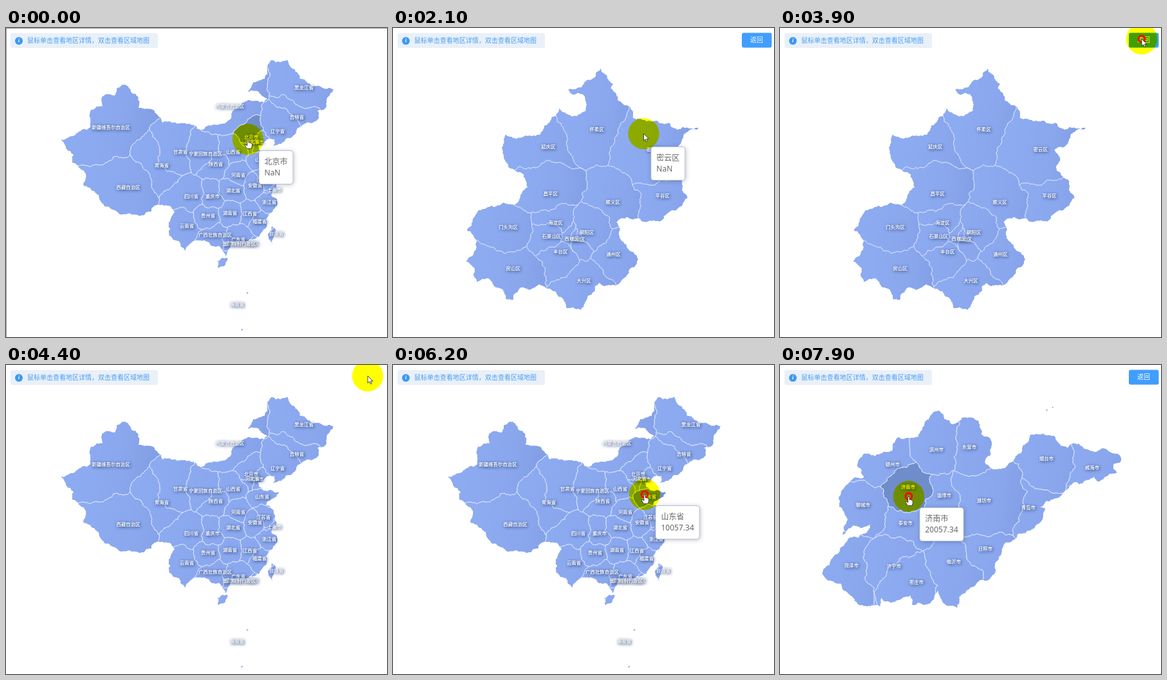
Write an HTML page with a canvas that moves like this. It is 592x480 px and loops after 8000 ms.

```html
<!DOCTYPE html>
<html lang="zh">
<head>
<meta charset="utf-8">
<style>
html, body { margin: 0; width: 100%; height: 100%; overflow: hidden; background: #fff; }
canvas { display: block; }
</style>
</head>
<body>
<canvas id="stage" width="592" height="480"></canvas>
<script>
const ctx = document.getElementById('stage').getContext('2d');
const LOOP = 8000, WIDTH = 592, HEIGHT = 480;
const SANS = '"Noto Sans", "Noto Sans CJK SC", sans-serif';

// Key points of each coast, clockwise; crinkle() adds the detail.
const chinaCoast = '86,173 107,167 132,154 132,127 150,122 149,108 169,105 181,88 190,91 205,107 206,124 234,134 244,147 275,148 306,158 328,151 350,140 352,129 380,113 406,110 393,99 376,99 384,84 402,79 413,50 438,50 456,78 481,90 509,95 496,125 484,128 484,142 452,157 437,171 415,183 418,171 409,172 391,182 400,195 424,198 402,218 420,249 412,260 421,266 418,280 405,302 384,328 345,344 341,354 336,344 306,330 287,334 279,346 253,322 262,285 235,274 212,291 180,290 145,263 121,245 124,226 103,209 105,197';
const beijingCoast = '328,29 339,42 350,57 346,65 381,98 386,118 410,124 450,126 465,139 506,136 474,157 448,175 458,194 452,213 474,231 484,261 462,284 447,290 405,304 398,298 357,304 361,325 371,344 395,371 372,404 356,418 325,414 304,440 292,462 266,458 248,430 186,422 170,445 158,443 130,408 106,412 102,388 87,375 104,355 106,338 88,320 100,297 153,270 174,274 197,243 188,218 176,214 155,192 153,165 157,148 195,150 224,141 248,114 254,101 266,111 301,106 302,90 297,76 280,76 270,66 298,57 317,46';
const shandongCoast = '247,71 268,92 300,82 313,108 328,118 327,140 318,150 335,162 350,160 390,108 425,110 446,129 458,122 480,132 525,138 529,150 518,155 523,168 495,181 488,173 450,187 425,208 402,222 412,222 408,238 370,262 340,300 335,318 305,340 278,360 275,377 262,374 245,350 240,362 205,372 203,358 157,362 155,375 135,375 95,340 75,335 66,322 85,295 95,283 130,262 140,248 97,265 103,235 92,220 95,200 110,180 130,175 120,155 130,138 175,132 185,112 215,112 225,90';

// Points of a rough line from a to b, the same in both directions.
function crinkle(a, b) {
  const flip = a[0] > b[0] || (a[0] === b[0] && a[1] > b[1]);
  const [p, q] = flip ? [b, a] : [a, b];
  let seed = (p[0] * 7919 + p[1] * 104729 + q[0] * 1299709 + q[1] * 15485) % 2147483646 + 1;
  const random = () => (seed = (seed * 16807) % 2147483647) / 2147483647;
  random();
  const points = [p];
  function split(x1, y1, x2, y2) {
    const dx = x2 - x1, dy = y2 - y1;
    if (Math.hypot(dx, dy) < 2.6) return points.push([x2, y2]);
    const k = (random() - .5) * .38;
    const mx = x1 + dx / 2 - dy * k, my = y1 + dy / 2 + dx * k;
    split(x1, y1, mx, my);
    split(mx, my, x2, y2);
  }
  split(...p, ...q);
  return flip ? points.reverse() : points;
}

function roughPath(corners) {
  const path = new Path2D();
  corners.forEach((c, i) => crinkle(c, corners[(i + 1) % corners.length])
    .forEach((p, j) => i + j ? path.lineTo(...p) : path.moveTo(...p)));
  path.closePath();
  return path;
}

// Power distance: a region owns the points for which this is smallest.
const distance = (s, x, y) => (x - s.x) ** 2 + (y - s.y) ** 2 - s.weight;

function cellOf(site, sites) {
  let poly = [[0, 0], [WIDTH, 0], [WIDTH, HEIGHT], [0, HEIGHT]];
  for (const other of sites) {
    if (other === site) continue;
    const side = p => distance(site, ...p) - distance(other, ...p);
    poly = poly.flatMap((p, i) => {
      const q = poly[(i + 1) % poly.length], a = side(p), b = side(q);
      const kept = a <= 0 ? [p] : [];
      if (a * b < 0) kept.push(p.map((v, n) => v + (q[n] - v) * a / (a - b)));
      return kept;
    });
  }
  return roughPath(poly.map(p => p.map(Math.round)));
}

// Each label is "name x y [weight]"; borders follow from the labels.
function makeMap(coasts, labels) {
  const land = new Path2D();
  for (const coast of coasts) land.addPath(roughPath(coast.split(' ').map(p => p.split(',').map(Number))));
  const sites = labels.split('|').map(label => {
    const [name, x, y, weight = 0] = label.split(' ');
    return { name, x: +x, y: +y, weight: +weight };
  });
  for (const site of sites) {
    site.cell = cellOf(site, sites);
    site.fill = ctx.createLinearGradient(site.x - 55, site.y, site.x + 65, site.y + 15);
    site.fill.addColorStop(0, '#8dabf1');
    site.fill.addColorStop(.6, '#8aa7ee');
    site.fill.addColorStop(1, '#829fe6');
  }
  return { land, sites };
}

const china = makeMap(
  [chinaCoast, '328,362 344,357 341,367 330,373', '413,308 419,316 414,338 408,327', '374,410 377,411 375,413', '365,470 368,467 368,469'],
  '黑龙江省 463 93|吉林省 452 139|辽宁省 422 161|内蒙古自治区 348 122 1000|北京市 381 170|天津市 389 178|河北省 383 177|山西省 353 193|山东省 398 205|新疆维吾尔自治区 163 155|甘肃省 271 193|宁夏回族自治区 310 196|陕西省 326 212|青海省 242 214|河南省 361 229|江苏省 400 237|安徽省 387 245|上海市 417 252|湖北省 353 253|西藏自治区 190 248|四川省 288 262|重庆市 321 262|浙江省 409 271|贵州省 314 292|湖南省 348 288|江西省 379 289|福建省 394 301|云南省 281 308|广西壮族自治区 325 322|广东省 361 329 150|香港特别行政区 367 335|澳门特别行政区 362 336|台湾省 420 320|海南省 359 430');
const beijing = makeMap(
  [beijingCoast],
  '怀柔区 321 139|延庆区 234 170|密云区 423 175 3000|昌平区 238 255|顺义区 350 270|平谷区 439 258 1000|门头沟区 162 314|海淀区 247 307|朝阳区 303 324|石景山区 240 331|东城区 287 336|西城区 276 335|丰台区 256 358|通州区 351 363|房山区 171 389|大兴区 298 410');
const shandong = makeMap(
  [shandongCoast, '414,69 416,70 414,72', '423,65 425,66 423,67'],
  '滨州市 243 132|东营市 294 128|德州市 175 155|济南市 199 190 300|淄博市 255 203|聊城市 129 218|潍坊市 317 211 2500|烟台市 414 146|威海市 485 160|青岛市 386 222|泰安市 195 246|日照市 319 286|菏泽市 111 312|济宁市 177 313|枣庄市 212 338|临沂市 270 306');

const views = [[0, china], [600, beijing], [4000, china], [6400, shandong]];
const values = { 山东省: '10057.34', 济南市: '20057.34' };
const track = [[0, 376, 173], [600, 376, 173], [900, 380, 169], [1900, 380, 169], [2600, 413, 152], [2750, 413, 152], [3100, 554, 56], [3500, 562, 17],
  [4700, 562, 17], [5800, 391, 201], [6600, 391, 201], [7000, 311, 206], [7400, 228, 206], [7700, 200, 204], [LOOP, 200, 204]];
const clicks = [300, 480, 3800, 6120, 6300, 7840];

const ramp = (t, a, b) => Math.min(1, Math.max(0, (t - a) / (b - a)));
const mapAt = t => views.filter(v => v[0] <= t).pop()[1];

function pointer(t) {
  const i = Math.max(1, track.findIndex(k => k[0] >= t));
  const [a, x, y] = track[i - 1], [b, u, v] = track[i];
  const k = ramp(t, a, b);
  return [x + (u - x) * k, y + (v - y) * k];
}

// The Beijing map shrinks once towards a fixed point.
function cameraAt(t) {
  const zoom = mapAt(t) === beijing ? 1 - .135 * ramp(t, 1500, 1700) : 1;
  return { zoom, ox: 288 * (1 - zoom), oy: 280 * (1 - zoom) };
}

function regionAt(t) {
  const { land, sites } = mapAt(t), { zoom, ox, oy } = cameraAt(t);
  const [px, py] = pointer(t), x = (px - ox) / zoom, y = (py - oy) / zoom;
  if (!ctx.isPointInPath(land, x, y)) return null;
  return sites.reduce((a, b) => distance(b, x, y) < distance(a, x, y) ? b : a);
}

function shadow(color, blur, offset = 0) {
  ctx.shadowColor = color;
  ctx.shadowBlur = blur;
  ctx.shadowOffsetX = ctx.shadowOffsetY = offset;
}

function text(str, x, y, size, color, align = 'left') {
  ctx.font = `${size}px ${SANS}`;
  ctx.textAlign = align;
  ctx.textBaseline = 'middle';
  ctx.fillStyle = color;
  ctx.fillText(str, x, y);
}

function box(x, y, w, h, r, color) {
  ctx.beginPath();
  ctx.roundRect(x, y, w, h, r);
  ctx.fillStyle = color;
  ctx.fill();
}

function disc(x, y, r, color) {
  ctx.beginPath();
  ctx.arc(x, y, r, 0, 7);
  ctx.fillStyle = color;
  ctx.fill();
}

function drawMap({ land, sites }, { zoom, ox, oy }, active) {
  ctx.save();
  ctx.transform(zoom, 0, 0, zoom, ox, oy);
  ctx.fillStyle = '#8aa7ee';
  ctx.fill(land);
  ctx.clip(land);
  for (const site of sites) {
    ctx.fillStyle = site === active ? '#6f8dcb' : site.fill;
    ctx.fill(site.cell);
  }
  ctx.strokeStyle = '#d9e4fc';
  ctx.lineWidth = .9;
  sites.forEach(s => ctx.stroke(s.cell));
  ctx.restore();

  ctx.save();
  shadow('rgba(45,70,120,.9)', 4, 1);
  for (const { name, x, y } of sites)
    for (let pass = 0; pass < 2; pass++) text(name, ox + x * zoom, oy + y * zoom, 7.4, '#fff', 'center');
  ctx.restore();
}

function drawHeader(back) {
  box(7, 8, 229, 23, 3, '#e9f0f8');
  disc(20, 20, 6, '#3d98f5');
  ctx.font = 'italic bold 9px "Liberation Serif", serif';
  ctx.textAlign = 'center';
  ctx.textBaseline = 'middle';
  ctx.fillStyle = '#fff';
  ctx.fillText('i', 20, 20);
  text('鼠标单击查看地区详情，双击查看区域地图', 33, 20, 10, '#469df5');
  if (!back) return;
  box(542, 7.5, 46.5, 23, 3, '#409eff');
  text('返回', 565, 19.5, 10, '#fff', 'center');
}

function drawTip(name, value, x, y, alpha) {
  ctx.save();
  ctx.globalAlpha = alpha;
  ctx.font = `12px ${SANS}`;
  const w = Math.max(ctx.measureText(name).width, ctx.measureText(value).width) + 17;
  if (alpha === 1) shadow('rgba(0,0,0,.25)', 7, 1);
  box(x, y, w, 52, 4, '#fff');
  shadow('transparent', 0);
  ctx.strokeStyle = '#a3b2d2';
  ctx.lineWidth = .8;
  ctx.stroke();
  text(name, x + 8.5, y + 18, 12, '#666');
  text(value, x + 8.5, y + 35.5, 12, '#666');
  ctx.restore();
}

const arrow = new Path2D('M0 0V11L2.6 8.7L4.4 12.6L6.2 11.8L4.5 8H8Z');
const hand = new Path2D('M-1.2 1Q0-.8 1.2 1V5.2Q2.6 4.4 3.2 5.6Q4.6 5 5 6.4Q6.4 6 6.4 7.5V10.5L5 14.5H-1.5L-4.6 9.5Q-4.8 7.6-3 8.2L-1.2 9.8Z');

function drawPointer(x, y, shape, clicked) {
  ctx.save();
  ctx.translate(x, y);
  if (clicked) {
    ctx.beginPath();
    ctx.arc(0, 0, 5, 0, 7);
    ctx.strokeStyle = '#f00';
    ctx.lineWidth = 3;
    ctx.stroke();
  }
  ctx.fillStyle = '#fff';
  ctx.fill(shape);
  ctx.strokeStyle = '#333';
  ctx.lineWidth = .9;
  ctx.stroke(shape);
  ctx.restore();
}

// The tip trails the pointer, stays where it left the land and fades.
function drawHover(t) {
  for (let age = 0; age < 600; age += 20) {
    const since = Math.max(0, t - age), region = regionAt(since);
    if (!region) continue;
    const [x, y] = pointer(since - 120);
    return drawTip(region.name, values[region.name] || 'NaN', x + 17, y + 17.5, 1 - ramp(age, 200, 600));
  }
}

function draw(t) {
  const map = mapAt(t), region = regionAt(t);
  const touch = region && map !== beijing;
  const [x, y] = pointer(t);
  ctx.fillStyle = '#fff';
  ctx.fillRect(0, 0, WIDTH, HEIGHT);
  drawMap(map, cameraAt(t), touch && region);
  drawHeader(map !== china);
  if (t < 100) {
    ctx.fillStyle = '#999';
    ctx.fillRect(0, 0, WIDTH, 1);
    ctx.fillRect(0, 0, 1, HEIGHT);
  }
  ctx.globalCompositeOperation = 'multiply';
  disc(x, y, 24.2, '#ff0');
  ctx.globalCompositeOperation = 'source-over';
  drawHover(t);
  drawPointer(x, y, touch ? hand : arrow, clicks.some(c => t >= c && t < c + 130));
}

function frame(now) {
  draw(now % LOOP);
  requestAnimationFrame(frame);
}
requestAnimationFrame(frame);
</script>
</body>
</html>
```
